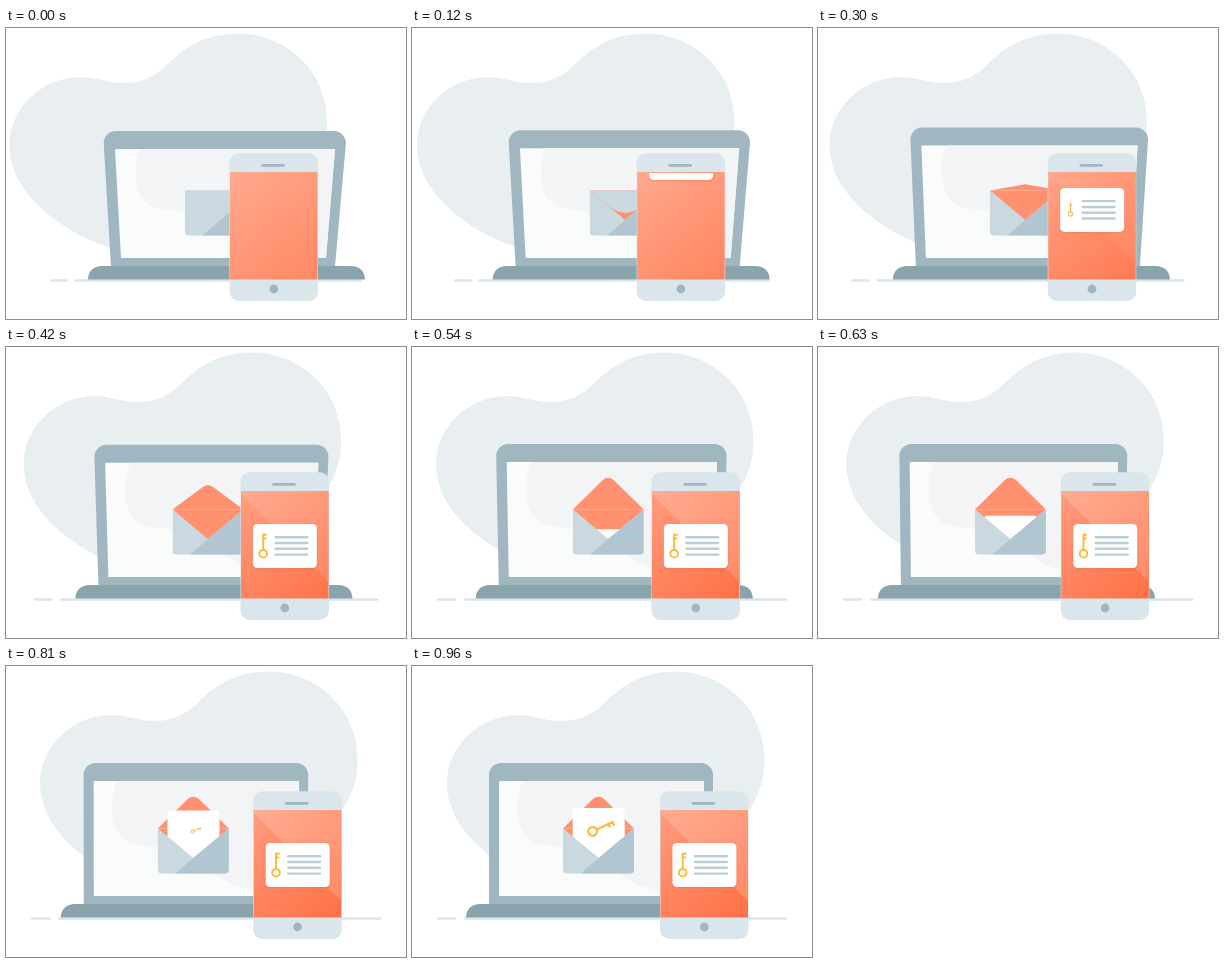
An HTML page with a canvas that plays this animation: 400x291 px, repeating every 1410 ms.

```html
<!DOCTYPE html>
<html lang="en">
<head>
<meta charset="utf-8">
<title>Secure mail</title>
<style>
html, body { margin: 0; width: 100%; height: 100%; overflow: hidden; background: #fff; }
canvas { display: block; width: 400px; height: 291px; }
</style>
</head>
<body>
<canvas id="stage" width="400" height="291"></canvas>
<script>
const ctx = document.getElementById('stage').getContext('2d');
const LOOP = 1410, STEP = 30;
const STEEL = '#a0b7c1', BASE = '#89a4ad', PALE = '#dbe6ec';
const PAPER = '#cad8e0', FOLD = '#b2c6d2', ORANGE = '#ff9170', GOLD = '#fbbc3d';

const mix = (a, b, k) => a + (b - a) * k;
const ease = (t, from, to) => {
  const k = Math.min(1, Math.max(0, (t - from) / (to - from)));
  return (1 - Math.cos(Math.PI * k)) / 2;
};
const blend = (a, b, k) => `rgb(${a.map((v, i) => Math.round(mix(v, b[i], k)))})`;

function fill(path, color) {
  ctx.fillStyle = color;
  ctx.fill(path);
}

function poly(points) {
  const p = new Path2D();
  points.forEach(([x, y]) => p.lineTo(x, y));
  p.closePath();
  return p;
}

function box(x, y, w, h, r) {
  const p = new Path2D();
  p.roundRect(x, y, w, h, r);
  return p;
}

function line(x1, y1, x2, y2, width, color, cap = 'round') {
  ctx.beginPath();
  ctx.moveTo(x1, y1);
  ctx.lineTo(x2, y2);
  ctx.lineWidth = width;
  ctx.strokeStyle = color;
  ctx.lineCap = cap;
  ctx.stroke();
}

function shifted(x, y, draw) {
  ctx.save();
  ctx.translate(x, y);
  draw();
  ctx.restore();
}

const cloud = new Path2D('M3.5 117C3.5 80 36 49 75 49C92 49 100 55 117 55C136 55 148 49 161 37' +
  'C180 17 203 5.5 232 5.5C281 5.5 321 44 321 93C321 125 308 143 290 165' +
  'C250 215 190 236 130 226C95 220 65 205 43 187C20 168 3.5 145 3.5 117Z');
const glare = new Path2D('M139 110C130 124 129 140 130 151C132 170 142 179 157 181' +
  'C185 184 205 188 225 205C245 222 270 232 340 232L340 110Z');
const foot = new Path2D('M82 251.5C82 243 88 238 96 238L345 238C353 238 359 243 359 251.5Z');

function key(x, y, scale, angle) {
  if (scale <= 0) return;
  shifted(x, y, () => {
    ctx.rotate(angle);
    ctx.scale(scale, scale);
    line(0, 4.5, 0, -12, 2, GOLD, 'butt');
    line(0, -11, 3.6, -11, 2, GOLD, 'butt');
    line(0, -7.2, 3.2, -7.2, 2, GOLD, 'butt');
    ctx.beginPath();
    ctx.arc(0, 8, 3.8, 0, Math.PI * 2);
    ctx.stroke();
  });
}

function ground(q) {
  const y = 252.5;
  line(mix(45.2, 26.2, q), y, mix(60.5, 43.3, q), y, 2.4, PALE);
  line(mix(69, 53.2, q), y, mix(354.5, 373.8, q), y, 2.4, PALE);
}

function laptop(p, q, t) {
  const top = mix(103, 97, q), glass = mix(121, 115, q), tilt = 1 - p;
  const left = 105 - 8 * tilt, right = 329 + 12 * tilt;
  const lid = new Path2D();
  lid.moveTo(105, 239);
  lid.arcTo(left, top, right, top, 12);
  lid.arcTo(right, top, 329, 239, 12);
  lid.lineTo(329, 239);
  lid.closePath();
  fill(lid, STEEL);

  const screen = poly([[115 - 6 * tilt, glass], [320 + 9 * tilt, glass], [320, 230], [115, 230]]);
  fill(screen, '#fafbfb');
  ctx.save();
  ctx.clip(screen);
  ctx.translate(4 * p, -2 * p);
  fill(glare, '#f3f4f6');
  ctx.restore();

  shifted(179, 0, () => envelope(q, t));
  fill(foot, BASE);
}

function envelope(q, t) {
  const tip = mix(192, 130, q), mid = 35.5, w = 71, hinge = 162.5;
  const closed = tip > 191.5;
  fill(poly([[0, hinge], [w, hinge], [mid, 193]]), closed ? PAPER : ORANGE);

  if (tip < hinge) {
    const flap = new Path2D();
    flap.moveTo(0, hinge);
    flap.arcTo(mid, tip - 2.4 * (hinge - tip) / 32, w, hinge, 8);
    flap.lineTo(w, hinge);
    flap.closePath();
    fill(flap, ORANGE);
  }

  const top = mix(192, 142, ease(t, 400, 880));
  if (t > 400) {
    ctx.save();
    ctx.clip(poly([[0, 100], [w, 100], [w, hinge], [mid, 192.5], [0, hinge]]));
    fill(box(9.7, top, 52, 70, 2), '#fff');
    key(38, top + 19.5, ease(t, 720, 930) * 1.15, 1.13);
    ctx.restore();
  }

  if (tip > hinge) {
    const k = (tip - hinge) / 29.5, y = hinge + 14 * Math.min(1, k * 1.25);
    const flap = new Path2D();
    flap.moveTo(0, hinge);
    flap.lineTo(16.5, y);
    flap.quadraticCurveTo(mid, 2 * tip - y, w - 16.5, y);
    flap.lineTo(w, hinge);
    flap.closePath();
    fill(flap, PAPER);
  }

  ctx.save();
  ctx.clip(box(0, 150, w, 57.5, 4));
  fill(poly([[0, hinge], [mid, 192], [w, hinge], [w, 208], [0, 208]]), PAPER);
  fill(poly([[w, hinge], [mid, 192], [17, 208], [w, 208]]), FOLD);
  ctx.restore();
}

function phone(q, t) {
  const x = 223.5, w = 88.5, y = 144, h = 107.5;
  fill(box(x, 125.3, w, 147.7, 9), PALE);
  line(x + 33, 137.4, x + 54, 137.4, 2.6, STEEL);
  ctx.beginPath();
  ctx.arc(x + w / 2, 261, 4.4, 0, Math.PI * 2);
  ctx.fillStyle = STEEL;
  ctx.fill();

  const sx = x + .5, sw = w - 1;
  const body = ctx.createLinearGradient(sx, y, sx + sw, y + h);
  body.addColorStop(0, blend([255, 170, 143], [255, 156, 127], q));
  body.addColorStop(1, blend([255, 136, 99], [255, 112, 69], q));
  fill(box(sx, y, sw, h, 0), body);
  ctx.globalAlpha = q;
  const shine = ctx.createLinearGradient(sx, y, sx + sw, y + h * .85);
  shine.addColorStop(0, '#ffad93');
  shine.addColorStop(1, '#ff8a66');
  fill(poly([[sx, y], [sx + sw, y], [sx + sw, y + 91], [sx, y + 3]]), shine);
  ctx.globalAlpha = 1;

  ctx.save();
  ctx.clip(box(sx, y + 1, sw, h - 1, 0));
  shifted(x + 12.4, mix(98, 177, ease(t, 30, 420)), () => card(t));
  ctx.restore();
}

function card(t) {
  ctx.save();
  ctx.shadowColor = 'rgba(190,70,30,.22)';
  ctx.shadowBlur = 3;
  ctx.shadowOffsetY = 1;
  fill(box(0, 0, 64, 44, 4.5), '#fff');
  ctx.restore();
  for (let i = 0; i < 4; i++) {
    const y = 13.2 + 5.8 * i;
    line(22.6, y, 54.4, y, 2.4, '#bccdd6');
  }
  key(10.3, 21.7, ease(t, 170, 420), 0);
}

function draw(t) {
  const p = ease(t, -10, 910), q = ease(t, 0, 550);
  ctx.fillStyle = '#fff';
  ctx.fillRect(0, 0, 400, 291);
  shifted(31.5 * p, 0, () => fill(cloud, '#e9eff1'));
  ground(q);
  shifted(-28 * p, 0, () => laptop(p, q, t));
  shifted(24.5 * p, 0, () => phone(q, t));
}

const start = performance.now();
function tick() {
  const t = (performance.now() - start) % LOOP;
  draw(Math.min(960, Math.floor(t / STEP) * STEP));
  requestAnimationFrame(tick);
}
tick();
</script>
</body>
</html>
```
